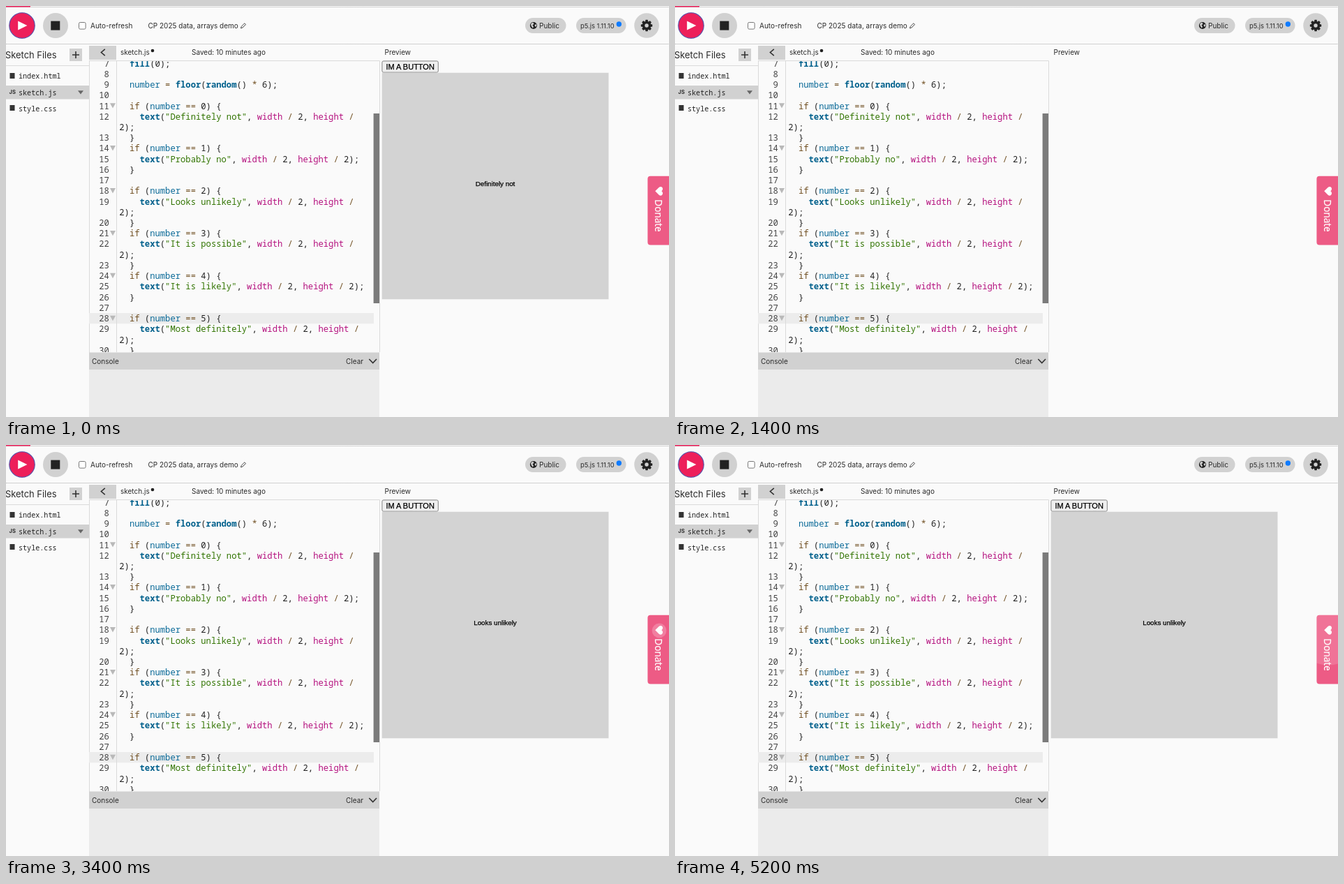
Write an HTML page that moves like this. It is 950 by 589 pixels and loops after 5.4 s.

```html
<!DOCTYPE html>
<html lang="en">
<head>
<meta charset="utf-8">
<title>Sketch editor</title>
<style>
  html, body { margin: 0; width: 100%; height: 100%; overflow: hidden; background: #fafafa; }
  svg { display: block; width: 950px; height: 589px; }
  text { white-space: pre; fill: #2b2b2b; font: 10px Inter, sans-serif; }
  .title { font-size: 12.9px; }
  .pill { font-size: 9.4px; }
  .file { fill: #222; font: 10.1px "Noto Sans Mono", monospace; }
  .code text { fill: #222; font: 12.2px "Noto Sans Mono", monospace; }
  .code .num { fill: #444; text-anchor: end; }
  .code .fn { fill: #00608c; font-weight: 700; }
  .code .var { fill: #0a6a98; }
  .code .size { fill: #b5127f; }
  .code .str { fill: #317400; }
  .code .op { fill: #704f21; }
  .btn { fill: #000; stroke: #000; stroke-width: .25; font: 11px "Liberation Sans", Arial, sans-serif; }
  .answer { fill: #000; stroke: #000; stroke-width: .25; font: 9.8px "Liberation Sans", Arial, sans-serif; text-anchor: middle; }
  .loading { fill: #000; font: 13px "Liberation Serif", Times, serif; }
  .donate { fill: #fff; stroke: #fff; stroke-width: .25; font: 13.6px "Open Sans", sans-serif; }
  .grey { fill: #d1d1d1; }
  .dark { fill: #222; }
  .rule { fill: none; stroke: #dadada; }
  .dots { stroke: #a8a8a8; stroke-dasharray: 1 1; }
  .line { fill: none; stroke: #333; stroke-width: 1.6; }
</style>
</head>
<body>
<svg viewBox="0 0 950 589">
  <defs>
    <clipPath id="editorClip"><rect x="119" y="79" width="416" height="417"/></clipPath>
    <clipPath id="donateClip"><rect x="919.4" y="243.7" width="40" height="98.8" rx="4"/></clipPath>
  </defs>
  <rect width="950" height="589" fill="#fafafa"/>

  <!-- toolbar -->
  <path class="dots" d="M0 1.5H950M0 54.5H950"/>
  <rect width="35" height="1.5" fill="#ed225d"/>
  <circle cx="23" cy="28" r="18.2" fill="#ed1f5a" stroke="#4f4fa8" stroke-width="1.1"/>
  <path d="M17.2 21.4L30.4 28L17.2 34.6Z" fill="#fff"/>
  <circle class="grey" cx="71" cy="28" r="18"/>
  <rect class="dark" x="64.3" y="21.6" width="13" height="13"/>
  <rect x="104.5" y="23.5" width="9.6" height="9.6" rx="1.8" fill="#fff" stroke="#777"/>
  <text x="121" y="31.5">Auto-refresh</text>
  <text x="203.5" y="31.5">CP 2025 data, arrays demo</text>
  <path d="M336.5 31.8L337.2 29.4L341.8 24.8L343.5 26.5L338.9 31.1Z" fill="none" stroke="#444"/>
  <rect class="grey" x="744" y="17" width="58.5" height="22" rx="11"/>
  <circle class="dark" cx="755.8" cy="28" r="5"/>
  <path class="grey" d="M752 25.5l3-2 1.5 2-2 2 1.5 2.5-1.5 1.5-2-3ZM757.5 27l2.2-1 .4 2.5-1.8 1.5Z"/>
  <text x="764" y="31.5">Public</text>
  <rect class="grey" x="817" y="17" width="71.5" height="22" rx="11"/>
  <text class="pill" x="823" y="31.5">p5.js 1.11.10</text>
  <circle cx="878.3" cy="26" r="3.7" fill="#0f7bff"/>
  <circle class="grey" cx="918" cy="28" r="17.8"/>
  <g id="gear" transform="translate(918 28)"></g>

  <!-- file list -->
  <text class="title" x="-1" y="74.8">Sketch Files</text>
  <rect class="grey" x="91" y="61" width="18" height="18"/>
  <path class="line" d="M95 70H105M100 65V75" stroke-width="1.2"/>
  <path class="rule" d="M0 85.5H119"/>
  <rect class="grey" y="114" width="119" height="19.5"/>
  <rect x="5.5" y="96" width="7" height="8" fill="#333"/>
  <text x="4.5" y="125.8" style="font-size:7.6px;font-weight:700">JS</text>
  <rect x="5.5" y="142" width="7" height="8" fill="#333"/>
  <text class="file" x="18" y="104.3">index.html</text>
  <text class="file" x="18" y="127.6">sketch.js</text>
  <text class="file" x="18" y="150.8">style.css</text>
  <path d="M103 121.3H111L107 126.6Z" fill="#666"/>

  <!-- editor -->
  <rect class="grey" x="119" y="57" width="39" height="20"/>
  <path class="line" d="M141.8 61.8L136.4 66.5L141.8 71.2"/>
  <text x="164" y="70">sketch.js</text>
  <circle class="dark" cx="210" cy="64" r="2.3"/>
  <text x="266" y="70">Saved: 10 minutes ago</text>
  <path class="rule" d="M119 78.5H535.5V496M119.5 78V589"/>
  <g class="code" id="code" clip-path="url(#editorClip)">
    <rect x="119" y="440" width="408" height="15.2" fill="#ececec"/>
    <path class="rule" d="M158.5 79V496"/>
  </g>
  <rect x="526.6" y="154" width="8.4" height="272" fill="#7b7b7b"/>
  <rect class="grey" x="119" y="496.5" width="416" height="24.5"/>
  <rect x="119" y="521" width="416" height="68" fill="#ebebeb"/>
  <text x="123" y="512.5">Console</text>
  <text x="487" y="512.5">Clear</text>
  <path class="line" d="M520.3 506L525.7 511.5L531 506"/>

  <!-- preview -->
  <text x="542.5" y="70">Preview</text>
  <g id="button">
    <rect x="538.9" y="78.9" width="80.4" height="16.2" rx="2" fill="#efefef" stroke="#767676" stroke-width=".9"/>
    <text class="btn" x="544.4" y="90.6">IM A BUTTON</text>
  </g>
  <text class="loading" id="loading" x="538.5" y="107.5">Loading...</text>
  <g id="canvas">
    <rect x="538.7" y="95.7" width="324.8" height="324.6" fill="#d3d3d3"/>
    <text class="answer" id="answer" x="701" y="258"></text>
  </g>

  <!-- donate tab -->
  <g clip-path="url(#donateClip)">
    <rect x="919" y="243" width="31" height="100" fill="#ed5b85"/>
    <circle id="ripple" cx="936" cy="266" fill="#fff"/>
    <path transform="translate(936 265.3) rotate(90)" fill="#fff"
      d="M0 5.8L-5.4 .4C-7.4 -2 -6 -5 -3.2 -5C-1.6 -5 -.6 -4.2 0 -3.2C.6 -4.2 1.6 -5 3.2 -5C6 -5 7.4 -2 5.4 .4Z"/>
    <text class="donate" transform="translate(930.3 277.3) rotate(90)">Donate</text>
  </g>
</svg>
<script>
const NS = "http://www.w3.org/2000/svg";
const $ = id => document.getElementById(id);

function add(parent, tag, attrs, text) {
  const el = document.createElementNS(NS, tag);
  for (const key in attrs) el.setAttribute(key, attrs[key]);
  if (text !== undefined) el.textContent = text;
  return parent.appendChild(el);
}

// Gear icon: eight teeth around a ring
for (let a = 0; a < 360; a += 45) {
  add($("gear"), "rect", { x: -1.8, y: -8.2, width: 3.6, height: 4, rx: .8, class: "dark", transform: `rotate(${a})` });
}
add($("gear"), "circle", { r: 4.5, fill: "none", stroke: "#222", "stroke-width": 3.6 });

// Code listing
const ROW = 15.227, TOP = 86.6, LEFT = 162.3, FIRST_LINE = 7, MAX_COLS = 49;
const answers = ["Definitely not", "Probably no", "Looks unlikely", "It is possible", "It is likely", "Most definitely"];
const lines = ["  fill(0);", "", "  number = floor(random() * 6);", ""];
answers.forEach((answer, i) => {
  if (i === 2 || i === 5) lines.push("");
  lines.push(`  if (number == ${i}) {`, `    text("${answer}", width / 2, height / 2);`, "  }");
});

const rules = [
  [/^"/, "str"],
  [/^(fill|floor|random|text)$/, "fn"],
  [/^(width|height)$/, "size"],
  [/^number$/, "var"],
  [/^(if|[=*\/]+)$/, "op"],
];

function drawRow(code, row) {
  const el = add($("code"), "text", { x: LEFT, y: TOP + row * ROW });
  for (const token of code.match(/"[^"]*"|\w+|[=*\/]+|\s+|./g) || []) {
    const rule = rules.find(([pattern]) => pattern.test(token));
    add(el, "tspan", rule ? { class: rule[1] } : {}, token);
  }
}

let row = 0;
lines.forEach((code, i) => {
  const y = TOP + row * ROW;
  add($("code"), "text", { class: "num", x: 147.8, y }, FIRST_LINE + i);
  if (code.includes("if (")) {
    add($("code"), "path", { d: `M149 ${y - 8.3}h8l-4 7.4Z`, fill: "#b9b9b9" });
  }
  if (code.length > MAX_COLS) {
    const cut = code.lastIndexOf(" ");
    drawRow(code.slice(0, cut), row++);
    code = code.slice(cut + 1);
  }
  drawRow(code, row++);
});

// Preview states: start time and what is shown
const LOOP = 5400;
const steps = [
  [0, answers[0]], [400, "blank"], [600, "loading"], [800, answers[0]],
  [1400, "blank"], [1600, answers[0]], [3200, "blank"], [3400, answers[2]],
  [4600, "blank"], [4800, answers[2]],
];
const RIPPLE_START = 320, RIPPLE_PERIOD = 1500, RIPPLE_LIFE = 1000;

function show(id, on) {
  $(id).style.display = on ? "" : "none";
}

function render(t) {
  const state = steps.filter(([start]) => start <= t).pop()[1];
  const running = answers.includes(state);
  show("button", state !== "blank");
  show("loading", state === "loading");
  show("canvas", running);
  if (running) $("answer").textContent = state;

  const tick = Math.floor(t / 200) * 200;
  const age = (tick - RIPPLE_START + RIPPLE_PERIOD) % RIPPLE_PERIOD;
  $("ripple").setAttribute("r", age * .13);
  $("ripple").setAttribute("opacity", Math.max(0, .24 * (1 - age / RIPPLE_LIFE)));
}

const begin = performance.now();
function frame() {
  render((performance.now() - begin) % LOOP);
  requestAnimationFrame(frame);
}
frame();
</script>
</body>
</html>
```
